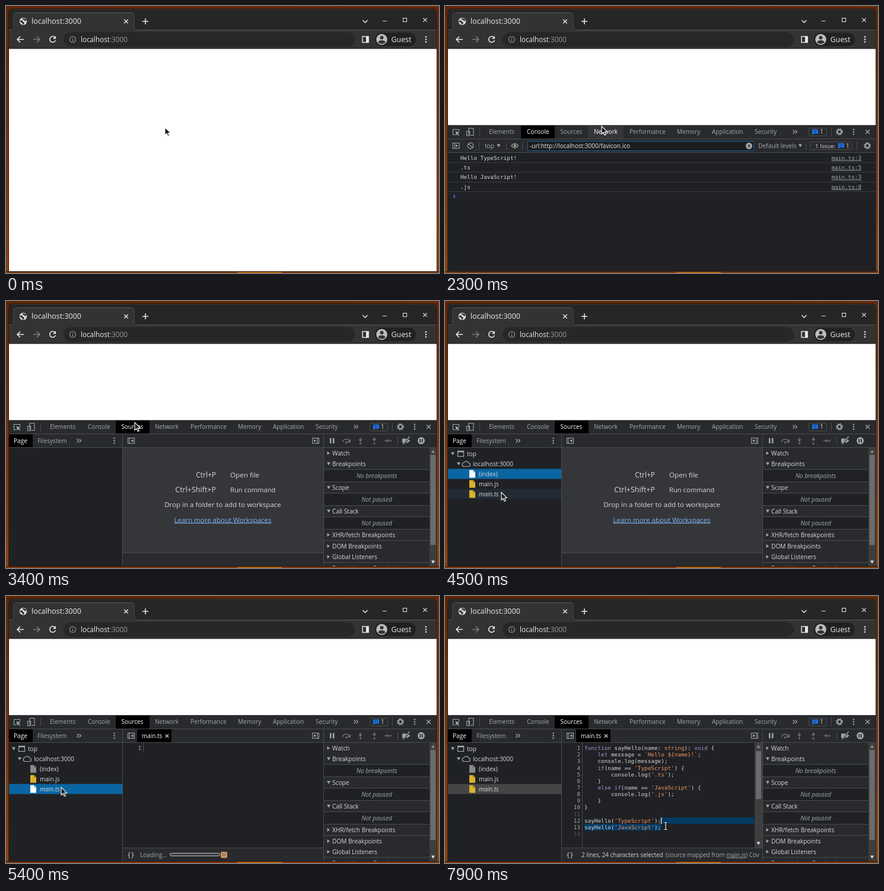
Animation, 730 px wide and 451 px high, one loop 8000 ms. Source, as an HTML page:

```html
<!DOCTYPE html>
<html lang="en">
<head>
<meta charset="utf-8">
<title>localhost:3000</title>
<style>
  html, body { margin: 0; width: 100%; height: 100%; overflow: hidden; background: #6a2c07; }
  svg { display: block; width: 730px; height: 451px; }
  text { font-family: "Open Sans", "Noto Sans", sans-serif; white-space: pre; }
  .mono { font-family: "DejaVu Sans Mono", monospace; }
  .it { font-style: italic; }
  .mid { text-anchor: middle; }
  .end { text-anchor: end; }
  .u { text-decoration: underline; }
</style>
</head>
<body>
<svg id="stage" viewBox="0 0 730 451" xmlns="http://www.w3.org/2000/svg"></svg>
<script>
const BAR = '#292a2d', BODY = '#202124', RULE = '#494c50', DIM = '#a3a8ae', TXT = '#d6d8db', BLUE = '#0a65a3';
const GOLD = '#dcb32a', TRACK = '#3e3e3f';

// Markup helpers
const rect = (x, y, w, h, fill, more = '') => `<rect x="${x}" y="${y}" width="${w}" height="${h}" fill="${fill}" ${more}/>`;
const text = (x, y, s, size = 10, fill = TXT, cls = '', more = '') =>
  `<text x="${x}" y="${y}" font-size="${size}" fill="${fill}" class="${cls}" ${more}>${s}</text>`;
const fill = (d, c = DIM, more = '') => `<path d="${d}" fill="${c}" ${more}/>`;
const line = (d, c = DIM, w = 1.2, more = '') => `<path d="${d}" fill="none" stroke="${c}" stroke-width="${w}" ${more}/>`;
const dot = (x, y, r, c, more = '') => `<circle cx="${x}" cy="${y}" r="${r}" fill="${c}" ${more}/>`;
const ring = (x, y, r, c = DIM, w = 1.2) => dot(x, y, r, 'none', `stroke="${c}" stroke-width="${w}"`);
const group = (id, ...parts) => `<g id="${id}">${parts.join('')}</g>`;
const hRule = (x, y, w) => rect(x, y, w, 1, RULE);
const vRule = (x, y, h) => rect(x, y, 1, h, RULE);
const cross = (x, y, r, c, w = 1.4) => line(`M${x - r} ${y - r}l${2 * r} ${2 * r}m0 ${-2 * r}l${-2 * r} ${2 * r}`, c, w);
const dots = (x, y, gap, r, c) => [-gap, 0, gap].map(d => dot(x, y + d, r, c)).join('');
const down = (x, y, c = DIM, r = 3) => fill(`M${x - r} ${y - r + .5}h${2 * r}l${-r} ${2 * r - 1}z`, c);
const up = (x, y, c = DIM, r = 3) => fill(`M${x - r} ${y + r - .5}h${2 * r}l${-r} ${1 - 2 * r}z`, c);
const right = (x, y) => fill(`M${x - 2} ${y - 3}v6l4.5 -3z`);
const gear = (x, y) => ring(x, y, 3.4, DIM, 2) +
  dot(x, y, 5.1, 'none', `stroke="${DIM}" stroke-width="1.8" stroke-dasharray="2 2.005"`);
const bubble = (x, y) => fill(`M${x} ${y}h10v7h-7l-3 2.5z`, '#1a73e8') +
  line(`M${x + 2} ${y + 2.4}h6m-6 2.2h4`, '#123a70', .9);
const more = (x, y) => line(`M${x - 3.5} ${y - 3}l3 3l-3 3m4 -6l3 3l-3 3`, DIM, 1.1);
const sheet = (y, id, c) => fill(`M41 ${y - 6.5}h6.5l3.5 3.5v9.5h-10z`, c, `id="${id}"`) +
  fill(`M47 ${y - 6.5}v4h4z`, '#000', 'opacity=".3"');

function desktop() {
  return `<defs><linearGradient id="wood" x2=".15" y2="1">
    <stop stop-color="#5f2505"/><stop offset=".5" stop-color="#74340a"/><stop offset="1" stop-color="#8a4411"/>
    </linearGradient></defs>` + rect(0, 0, 730, 451, 'url(#wood)');
}

function browser() {
  const W = '#e8e8e8';
  return [
    line('M4.5 448V12q0 -7.5 7.5 -7.5H719q7.5 0 7.5 7.5V448', '#1c120c', 1, 'opacity=".7"'),
    fill('M5 448V12q0 -7 7 -7H719q7 0 7 7V448z', '#262626'),
    line('M11 5.5H720', '#3d3833', 1),
    rect(5, 40, 721, 33, '#333333'),
    line('M5 40.5H9q4 0 4 -4V16q0 -4.5 4.5 -4.5H211q5 0 5 5V35q0 5.5 5 5.5H726', '#5a5a5a', 1),
    fill('M9 41q4.5 -1 4.5 -6V17q0 -5 5 -5H211q4.5 0 4.5 5V35q0 5 5 6z', '#333333'),
    dot(29, 26, 6.2, '#dedede'),
    fill('M24 24l4 1l1 2l2 1l-1 3l-2 .8l-.6 -3l-3.6 -2zM28.5 20.5l5 1.5l1 3l-3 .5l-1 -2l-3 -.5z', '#333'),
    text(43, 30, 'localhost:3000', 12.45, '#ececec'),
    cross(202.5, 26, 3.3, W), line('M230 26h10m-5 -5v10', W, 1.6),
    line('M601.5 24l4 4l4 -4', W, 1.5), line('M635 25.5h6.5', W, 1),
    rect(669.5, 20.5, 6, 6, 'none', `stroke="${W}"`), cross(706.5, 23.5, 3.2, W, 1.2),
    line('M30 56.5H19m5 -5l-5 5l5 5', W, 1.6),
    line('M46 56.5h11m-5 -5l5 5l-5 5', '#7c7c7c', 1.6),
    line('M82.8 53.3A5 5 0 1 0 83.5 58', W, 1.6), fill('M84 50.5v5h-5z', W),
    rect(97, 44, 491, 25, '#272727', 'rx="12.5"'),
    ring(112.5, 56.5, 5, '#9a9a9a', 1.1), line('M112.5 56v3.5m0 -6v1.3', '#9a9a9a', 1.2),
    text(126, 60.5, 'localhost<tspan fill="#999">:3000</tspan>', 11.7, '#e8e8e8'),
    rect(601, 51.5, 10, 10, 'none', `stroke="${W}" stroke-width="1.4"`), rect(607, 51, 4.5, 11, W),
    rect(622, 45, 69, 23, '#212121', 'rx="11.5"'),
    dot(633.5, 56.5, 9.3, '#bdbdbd'), dot(633.5, 53.6, 3, '#333'), fill('M627.5 62q0 -4 6 -4t6 4q-6 4 -12 0z', '#333'),
    text(649.5, 60.7, 'Guest', 12.4, '#ececec'),
    dots(708, 56.5, 4.2, 1.3, W),
    rect(5, 71, 721, 1, '#242223'),
    rect(5, 72.5, 721, 375.5, '#fff')
  ].join('');
}

const tabs = [['Elements', 74, 117], ['Console', 138, 175], ['Sources', 194.5, 231], ['Network', 251, 291],
  ['Performance', 311, 371], ['Memory', 391, 429], ['Application', 450, 502], ['Security', 522, 560]];

function topBar() {
  return group('tools',
    rect(5, 201, 721, 247, BODY), rect(5, 201, 721, 23, BAR), hRule(5, 201, 721), hRule(5, 224, 721),
    rect(0, 202, 0, 22, '#35363a', 'id="hover"'), rect(0, 202, 57, 22, '#000', 'id="picked"'),
    ...tabs.map(([name, x], i) => text(x, 215.8, name, 10.05, DIM, '', `id="tab${i}"`)),
    group('wide', text(588, 215.8, 'Lighthouse', 10.05, DIM), more(661, 212.5)),
    group('icons',
      line('M18 217.5h-4.5v-9h10v4', DIM, 1.1), fill('M17.5 211.5l7 2.5l-3 1.2l2.5 2.5l-1.2 1.2l-2.5 -2.5l-1 2.5z'),
      line('M40 217.5v-11h8v12h-5m-6.5 -7h5v7.5h-5z', DIM, 1.1), vRule(58, 206, 14),
      more(590, 212.5), vRule(651, 206, 14), gear(665, 212.5), dots(689, 212.5, 4, 1.2, DIM), cross(712.5, 212.5, 3.5, DIM, 1.3)),
    group('badge', rect(613.5, 206.5, 30, 13, 'none', `stroke="${RULE}" rx="1"`), bubble(619, 208.5), text(632, 216.2, '1', 10)));
}

function consoleView() {
  const log = [['Hello TypeScript!', 3], ['.ts', 5], ['Hello JavaScript!', 3], ['.js', 8]];
  const rows = log.map(([s, n], i) => {
    const y = 259.8 + i * 16.3;
    return text(26, y, s, 9.3, TXT, 'mono') + text(702, y, 'main.ts:' + n, 9.3, DIM, 'mono u end') +
      rect(5, Math.round(264 + i * 16.3), 721, 1, '#3a3b3e');
  });
  return group('console',
    rect(5, 225, 721, 22, BAR), hRule(5, 247, 721),
    rect(13, 231.5, 11, 9, 'none', `stroke="${DIM}"`), line('M16 231v10', DIM, 1), fill('M18 233.5v5l4 -2.5z'),
    ring(43, 236, 4.8), line('M39.6 232.6l6.8 6.8'), vRule(57, 230, 13),
    text(67, 239.7, 'top', 10.2, DIM), down(90.5, 236), vRule(103, 230, 13),
    line('M112 236q5.8 -7.5 11.5 0q-5.7 7.5 -11.5 0z'), dot(117.7, 236, 2.2, DIM), vRule(130, 230, 13),
    rect(139.5, 228.5, 381, 16, '#1c1d20', 'stroke="#1d5f9c"'),
    text(143, 239.7, '-url:http://localhost:3000/favicon.ico', 10.04, '#e4e6e8'),
    dot(512.5, 236.3, 5.5, '#a3a6aa'), cross(512.5, 236.3, 2, BODY, 1.2),
    text(528, 239.7, 'Default levels', 10.3, DIM), down(599, 236), vRule(608, 230, 13),
    rect(615.5, 229.5, 71, 13, 'none', `stroke="${RULE}" rx="1"`), text(624, 239.7, '1 Issue:', 9.8, TXT),
    bubble(663, 231.8), text(676, 239.7, '1', 10), vRule(694, 230, 13), gear(712, 236)) +
    group('prompt', line('M14 318.5l3 3l-3 3', '#2f83d6', 1.4)) + group('logs', ...rows) +
    group('caret', rect(25, 315, 1, 14, '#d8d8d8'));
}

function sidebar() {
  const sel = (id, y, c) => group(id, rect(5, y, 191.5, 17, c));
  return rect(5, 225, 191, 22, BAR) + rect(5, 225, 40, 22, '#000') + hRule(5, 247, 191) +
    text(13, 239.5, 'Page', 10.1, '#fff') + text(53, 239.5, 'Filesystem', 10.2, DIM) + more(123, 236) +
    dots(182.5, 236, 4, 1.2, DIM) +
    group('tree',
      rect(5, 0, 191, 17, '#242b34', 'id="rowHover"'),
      sel('selIndex', 283.5, BLUE), sel('selMain', 317.5, BLUE), sel('selGrey', 317.5, '#454545'),
      down(13, 258), rect(21.5, 253.5, 10, 9, 'none', `stroke="${DIM}" stroke-width="1.2"`), rect(21, 253, 11, 2.5, DIM),
      text(37, 261.7, 'top', 10.2), down(23, 275),
      line('M32 279.5a3.3 3.3 0 0 1 -.3 -6.5a4.8 4.8 0 0 1 8.5 .8a2.9 2.9 0 0 1 0 5.7z', DIM, 1.2),
      text(47, 278.7, 'localhost:3000', 10.1),
      sheet(292, 'indexIcon', '#8a8a8a'), text(57, 295.7, '(index)', 10.1),
      sheet(309, 'jsIcon', GOLD), text(57, 312.7, 'main.js', 10),
      sheet(326, 'tsIcon', GOLD), text(57, 329.7, 'main.ts', 10.2, TXT, 'it'));
}

const program = `function sayHello(name: string): void {
    let message = \`Hello \${name}!\`;
    console.log(message);
    if(name == 'TypeScript') {
        console.log('.ts');
    }
    else if(name == 'JavaScript') {
        console.log('.js');
    }
}

sayHello('TypeScript');
sayHello('JavaScript');
`.split('\n');
const paint = s => s.replace(/('[^']*'|`[^`]*`|\bstring\b)|\b(function|let|if|else|void)\b/g,
  (m, str) => `<tspan fill="${str ? '#f0955f' : '#a792d2'}">${m}</tspan>`);
const lineY = i => 260.2 + i * 11.14;

function editor() {
  const lines = program.map((s, i) =>
    text(228, lineY(i), i + 1, 9.3, i == 10 || i == 13 ? '#55585c' : DIM, 'mono end') +
    text(235, lineY(i), paint(s), 9.33, '#d6d8da', 'mono'));
  const mapped = x => text(x, 440.7, '(source mapped from <tspan class="u">main.js</tspan>) Coverage: n/a', 9.9, DIM);
  return rect(197, 225, 338, 22, BAR) + hRule(197, 247, 338) +
    [[205, 207.5], [516, 525.5]].map(([x, b], i) => rect(x + .5, 231.5, 11, 9, 'none', `stroke="${DIM}"`) +
      line(`M${b + (i ? -.5 : .5)} 231v10`, DIM, 1) +
      fill(i ? 'M519 233.5v5l4 -2.5z' : 'M214.5 233.5v5l-4 -2.5z')).join('') +
    rect(197, 425, 338, 23, BAR) + hRule(197, 425, 338) +
    group('empty', rect(197, 248, 338, 177, '#35363a'),
      text(354, 297.5, 'Ctrl+P', 12, TXT, 'end'), text(378, 297.5, 'Open file', 11.6),
      text(354, 323, 'Ctrl+Shift+P', 12.5, TXT, 'end'), text(378, 323, 'Run command', 11.2),
      text(365.5, 348.2, 'Drop in a folder to add to workspace', 11.54, TXT, 'mid'),
      text(365.5, 373.6, 'Learn more about Workspaces', 11.5, '#7db4f5', 'mid u')) +
    group('file', rect(221, 225, 58, 22, '#000'), text(229, 239.5, 'main.ts', 9.95, '#fff'), cross(271.5, 236.3, 2.7, '#ddd', 1.2),
      text(210.5, 440.5, '{}', 10, TXT, 'mono mid')) +
    group('loading', text(228, lineY(0), 1, 9.3, DIM, 'mono end'), vRule(231, 248, 17),
      text(226, 440.7, 'Loading…', 10.1, DIM),
      rect(276.5, 434.5, 84, 4.5, '#3a3b3e', 'rx="2.2" stroke="#c4c6c8"'),
      rect(362, 432, 11, 10.5, '#c59667', 'rx="2"'), line('M364 435h7m-7 3h7', '#8a6238', 1)) +
    group('marks', rect(365, 374, 156, 11, '#053a63'), rect(235, 385, 130, 11, '#053a63')) +
    group('code', vRule(231, 248, 177), ...lines, rect(522, 248, 13, 177, TRACK), up(528.5, 254, '#8a8d90'),
      rect(524, 262, 9, 81, '#686a6c'), down(528.5, 418, '#e0e0e0')) +
    group('bar', rect(364, 374, 1.2, 11, '#fff')) +
    group('idle', mapped(230)) +
    group('place', text(230, 440.7, 'Line 12, Column 24', 9.93, DIM), mapped(326)) +
    group('count', text(230, 440.7, '2 lines, 24 characters selected', 9.93, TXT), mapped(372)) +
    rect(530, 426, 5, 22, BAR);
}

function debuggerPane() {
  const heads = [['Watch', 248], ['Breakpoints', 266, 'No breakpoints'], ['Scope', 306, 'Not paused'],
    ['Call Stack', 346, 'Not paused'], ['XHR/fetch Breakpoints', 386], ['DOM Breakpoints', 405],
    ['Global Listeners', 423], ['Event Listener Breakpoints', 442]];
  const rows = heads.map(([name, y, note]) => rect(536, y, 178, 18, BAR) + hRule(536, y + 18, 178) +
    (note ? down(544, y + 9) + hRule(536, y + 39, 178) + text(625, y + 32.5, note, 10.2, DIM, 'it mid') : right(543.5, y + 9)) +
    text(550, y + 12.7, name, 10.15));
  const low = '#6b6e72';
  return rect(535, 225, 191, 223, BODY) + rect(535, 225, 191, 22, BAR) + rows.join('') + hRule(535, 247, 191) +
    rect(546, 231.5, 2.5, 9, DIM) + rect(551, 231.5, 2.5, 9, DIM) +
    line('M567.5 238a6 5.5 0 0 1 11.5 -1', low, 1.5) + fill('M581 233v6h-6z', low) + dot(573.5, 239, 1.7, low) +
    [597.5, 621].map((x, i) => line(`M${x} 231v6`, low, 1.5) +
      (i ? up(x, 232.5, low) : down(x, 236, low)) + dot(x, 240.7, 1.6, low)).join('') +
    line('M638 236h6', low, 1.5) + fill('M642.5 233l4 3l-4 3z', low) + dot(648.5, 236, 1.5, low) + vRule(660, 230, 13) +
    fill('M668 232.5h9l4.5 3.5l-4.5 3.5h-9z') + line('M670 242.5l10 -13', BAR, 3) + line('M669.5 242l11 -13', DIM, 1.3) +
    dot(700, 236, 6, DIM) + rect(697.3, 233, 1.8, 6, BAR) + rect(700.9, 233, 1.8, 6, BAR) +
    rect(714, 248, 12, 200, TRACK) + up(720, 254, '#8a8d90') + rect(715.5, 260, 9, 152, '#6a6c6f') + down(720, 441, '#e6e6e6') +
    vRule(535, 225, 223);
}

function pointer() {
  const beam = 'M-2.5 -6h2q.5 0 .5 1v10q0 1 -.5 1h-2M2.5 -6h-2q-.5 0 -.5 1v10q0 1 .5 1h2';
  return group('arrow', fill('M0 0V13.2L3 10.5L5.2 15.3L7.4 14.3L5.3 9.7L9.4 9.5z', '#1a1a1a', 'stroke="#fff" stroke-width="1.1"')) +
    group('beam', line(beam, '#111', 3), line(beam, '#fff', 1.2));
}

document.getElementById('stage').innerHTML = desktop() + browser() + topBar() + consoleView() +
  group('sources', sidebar(), vRule(196, 225, 223), editor(), debuggerPane()) +
  rect(0, 448, 730, 1, '#35180a') + rect(0, 449, 730, 2, '#7d390c') + rect(390, 449, 75, 2, '#b5650f') + pointer();

// Visible spans in ms: id, from, to, [from, to]
const spans = [
  ['tools', 1000, 8000], ['wide', 1000, 1100], ['icons', 1100, 8000], ['badge', 1500, 8000],
  ['console', 1200, 3300], ['prompt', 1200, 3300], ['logs', 1300, 3300], ['caret', 1700, 2300, 2800, 3300],
  ['sources', 3400, 8000], ['tree', 4000, 8000], ['empty', 3400, 5400], ['file', 5400, 8000],
  ['loading', 5400, 5500], ['code', 5500, 8000], ['selIndex', 4000, 5400], ['selMain', 5400, 7700],
  ['selGrey', 7700, 8000], ['idle', 5500, 7700], ['place', 7700, 7900], ['count', 7900, 8000],
  ['bar', 7700, 8000], ['marks', 7900, 8000]
];
// Pointer path: time, x, y
const path = [[0, 268, 205], [2200, 268, 205], [2300, 264, 203], [2900, 217, 205], [3900, 217, 205], [4500, 95, 323],
  [4900, 95, 323], [5200, 93, 323], [6200, 93, 323], [6700, 311, 343], [7100, 311, 343], [7600, 366, 380],
  [7700, 366, 380], [7900, 372, 388.5], [8000, 372, 388.5]];

const $ = id => document.getElementById(id);
const set = (id, attrs) => { for (const k in attrs) $(id).setAttribute(k, attrs[k]); };
const show = (id, on) => { $(id).style.display = on ? '' : 'none'; };

function pointerAt(t) {
  const i = path.findIndex(p => p[0] > t);
  const [t0, x0, y0] = path[i - 1], [t1, x1, y1] = path[i];
  const u = (t - t0) / (t1 - t0), e = u * u * (3 - 2 * u);
  return [x0 + (x1 - x0) * e, y0 + (y1 - y0) * e];
}

function draw(now) {
  const t = Math.floor(now / 100) * 100;
  for (const [id, ...s] of spans) show(id, t >= s[0] && t < s[1] || t >= s[2] && t < s[3]);

  const [x, y] = pointerAt(t);
  const typing = t >= 5500 && x > 231;
  show('arrow', !typing);
  show('beam', typing);
  set(typing ? 'beam' : 'arrow', { transform: `translate(${x.toFixed(1)} ${y.toFixed(1)})` });

  const picked = t < 3300 ? 1 : 2;
  const over = y < 224 ? tabs.findIndex(([, a, b]) => x >= a - 10 && x < b + 10) : -1;
  const edge = i => ({ x: Math.round(tabs[i][1] - 10), width: Math.round(tabs[i][2] - tabs[i][1] + 20) });
  set('picked', edge(picked));
  show('hover', over >= 0 && over != picked);
  if (over >= 0) set('hover', edge(over));
  tabs.forEach((_, i) => set('tab' + i, { fill: i == picked || i == over ? '#fff' : DIM }));

  const row = Math.floor((y - 249.5) / 17);
  show('rowHover', x < 196 && row >= 0 && row < 5);
  set('rowHover', { y: 249.5 + row * 17 });
  set('indexIcon', { fill: t < 5400 ? '#fff' : '#8a8a8a' });
  set('tsIcon', { fill: t >= 5400 && t < 7700 ? '#fff' : GOLD });
}

const start = performance.now();
(function tick() {
  draw((performance.now() - start) % 8000);
  requestAnimationFrame(tick);
})();
</script>
</body>
</html>
```
